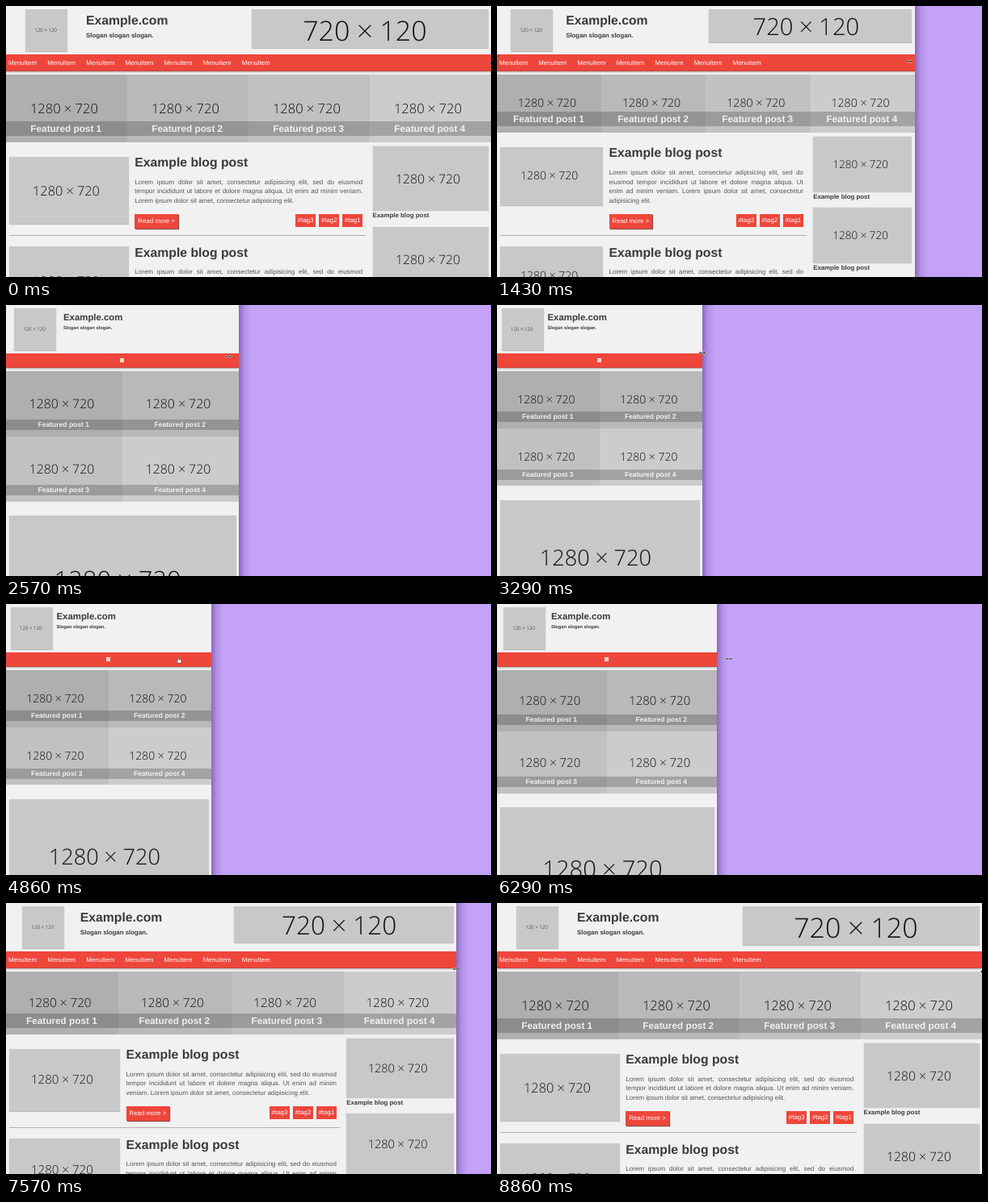
These frames come from a looping animation (600x336 px, 9010 ms). An HTML page:

```html
<!DOCTYPE html>
<html lang="en">
<head>
<meta charset="utf-8">
<title>Responsive blog layout</title>
<style>
html, body { margin: 0; width: 100%; height: 100%; overflow: hidden; background: #c4a2f8; }
h1, h2, p, figure { margin: 0; }
#stage { position: absolute; inset: 0; overflow: clip; contain: strict; }
#shade { position: absolute; top: 0; bottom: 0; left: var(--w); width: 15px; background: linear-gradient(90deg, rgba(45, 15, 95, .38), rgba(45, 15, 95, .12) 45%, transparent); }
#page {
  position: absolute; top: 0; left: 0; width: var(--w); height: 100%;
  overflow: clip; background: #f2f1f1; color: #3b3a3a;
  font: var(--b)/1.4 "Liberation Sans", Arial, sans-serif; text-rendering: geometricPrecision;
  --side: calc(var(--w) / 6); --main: calc(var(--w) - var(--side));
  --thumb: calc(var(--main) / 3 - 1.8px); --head: calc(var(--w) / 6);
}
.wide { --b: 7.87px; --bar: 20.5px; --side: calc(var(--w) / 4) !important; --feat: calc(var(--w) / 4); --ad: calc(var(--w) / 2 - 7px); --ratio: .16667; }
.medium { --b: 7.07px; --bar: 19px; --feat: calc(var(--w) / 2); --ad: calc(var(--w) * 5 / 12 - 7px); --ratio: .33333; }
.small { --b: 5.7px; --bar: 17.5px; --feat: calc(var(--w) / 2); --head: calc(var(--w) / 4) !important; --thumb: calc(var(--w) - 7px) !important; }
.small .ad, .small .text, .small hr, .small aside, .small nav span { display: none; }
.medium figure:nth-child(n+3), .wide nav i, .medium nav i { display: none; }

.img {
  --iw: var(--feat); width: var(--iw); height: calc(var(--iw) * .5625);
  display: flex; align-items: center; justify-content: center; background: #c9c8c8;
  font: 300 calc(var(--iw) * .11)/1 "Open Sans", "Noto Sans", sans-serif; color: #111; white-space: nowrap;
}
.img span { position: relative; left: -2.1%; top: .05em; }
header { position: relative; height: 60px; }
header .img, article .img { position: absolute; box-shadow: 0 1px 1px rgba(0, 0, 0, .22); }
.logo { --iw: 52px; height: 52px; top: 3.5px; left: calc(var(--head) / 2 - 26px); font-size: 6.1px; }
.ad { --iw: var(--ad); height: calc(var(--iw) * var(--ratio)); top: 3.5px; right: 3.5px; font-size: calc(var(--iw) * .116); }
.brand { position: absolute; left: calc(var(--head) - 1px); top: 10.3px; white-space: nowrap; }
h1 { font-size: 2em; line-height: 1.2; }
.brand p { margin-top: .1px; font-weight: bold; line-height: 2.1; }

nav {
  position: relative; height: var(--bar); line-height: calc(var(--bar) + 1.6px); padding-left: 3px; white-space: nowrap;
  color: #fff; background: #ee463b; box-shadow: inset 0 -1px #c9453c, 0 1px 2px rgba(0, 0, 0, .3);
}
nav span { margin-right: 13.2px; }
nav i { position: absolute; left: calc(50% - 3px); top: 6px; width: 5px; height: 5px; background: repeating-linear-gradient(#fff 0 1px, #f5a59f 1px 2px); }

.featured { display: flex; flex-wrap: wrap; margin-top: 4px; }
figure { position: relative; width: var(--feat); }
figcaption {
  position: absolute; left: 0; right: 0; bottom: 7.7px; padding-right: 1.5px; text-align: center;
  font-size: 1.5em; font-weight: bold; line-height: 1.533; color: rgba(255, 255, 255, .85); background: rgba(0, 0, 0, .2);
}
figure:nth-child(1) .img { background: #b0afaf; }
figure:nth-child(2) .img { background: #bab9b9; }
figure:nth-child(3) .img { background: #c2c1c1; }
figure:nth-child(4) .img { background: #cdcccc; }

.content { display: flex; }
main { width: var(--main); padding-top: 17.7px; flex: none; }
.small main { width: var(--w); }
article { position: relative; padding-bottom: 13px; }
article .img { --iw: var(--thumb); left: 3.5px; }
.small article .img { position: relative; }
.text { padding: 1.5px 8.8px 8.4px calc(var(--main) / 3 + 9.3px); }
h2 { font-size: 2em; line-height: .9; margin-bottom: 10.5px; white-space: nowrap; }
.text p { font-size: 1.02em; line-height: 1.44; text-align: justify; color: #555; }
.row { display: flex; align-items: flex-start; margin-top: 10.4px; height: 2.3em; white-space: nowrap; }
.row span { padding: 0 2.6px; margin-left: 4.2px; line-height: 2.04; color: #fff; background: #ee463b; }
.row .more { margin: 0 auto 0 0; padding: 0 4px; line-height: 2.3; box-shadow: 1px 1px 1px #8d4a46; }
hr { margin: 0 4.6px 0 3.5px; border: 0; height: 1px; background: #b3b2b2; }
aside { padding: 5px 3.5px 0; width: calc(var(--side) - 7px); font-weight: bold; }
aside .img { --iw: calc(var(--side) - 7px); box-shadow: 0 0 1px rgba(0, 0, 0, .25); }
aside p { margin: -.2px 0 8.4px; }

#cursor { position: absolute; left: -5px; top: -5px; width: 10px; height: 10px; overflow: visible; stroke: #fff; stroke-width: .6; }
</style>
</head>
<body>
<div id="stage">
  <div id="page"></div>
  <div id="shade"></div>
  <svg id="cursor" viewBox="-6 -6 12 12">
    <path id="resize" fill="#111" d="M-5 0L-2.5-2.2V-.8H2.5V-2.2L5 0L2.5 2.2V.8H-2.5V2.2Z"/>
    <path id="hand" fill="#fff" stroke="#222" d="M-1.6-4.2Q-.8-5 0-4.2V-1.4L3-.8Q3.8-.4 3.6.8L2.8 4H-1.2L-3.8.6Q-3.6-.6-1.6.6Z"/>
  </svg>
</div>
<script>
const $ = id => document.getElementById(id);
const page = $('page');
const img = (label, cls = '') => `<div class="img ${cls}"><span>${label}</span></div>`;
const times = (n, make) => Array.from({ length: n }, (_, i) => make(i + 1)).join('');
const big = '1280 × 720';
const start = 'Lorem ipsum dolor sit amet, consectetur adipisicing elit';
const lorem = `${start}, sed do eiusmod tempor incididunt ut labore et dolore magna aliqua. Ut enim ad minim veniam. ${start}.`;

page.innerHTML = `
<header>${img('120 × 120', 'logo')}
  <div class="brand"><h1>Example.com</h1><p>Slogan slogan slogan.</p></div>${img('', 'ad')}</header>
<nav>${times(7, () => '<span>MenuItem</span>')}<i></i></nav>
<section class="featured">${times(4, i => `<figure>${img(big)}<figcaption>Featured post ${i}</figcaption></figure>`)}</section>
<div class="content">
  <main>${times(2, () => `<article>${img(big)}
    <div class="text"><h2>Example blog post</h2><p>${lorem}</p>
      <div class="row"><span class="more">Read more &gt;</span><span>#tag3</span><span>#tag2</span><span>#tag1</span></div>
    </div><hr></article>`)}</main>
  <aside>${times(3, () => img(big) + '<p>Example blog post</p>')}</aside>
</div>`;
const adLabel = page.querySelector('.ad span');

// Keys are [step, ...values]; the picture advances seven steps a second.
const widths = [[0, 600], [6, 600], [8, 578], [15, 364], [16, 335], [18, 288], [20, 262], [22, 254],
  [43, 254], [44, 272], [47, 380], [51, 520], [53, 557], [56, 590], [58, 600], [63, 600]];
const pointer = [[0, 602, 71], [5, 602, 70], [8, 574, 69], [15, 351, 68], [18, 275, 64], [21, 254, 60], [24, 254, 59],
  [31, 214, 70], [38, 214, 70], [42, 254, 68], [44, 287, 68], [47, 399, 68], [51, 532, 76], [53, 557, 82], [58, 602, 85], [63, 602, 85]];

function at(keys, n) {
  const i = keys.findIndex(k => k[0] > n);
  const a = keys[i - 1], b = keys[i], f = (n - a[0]) / (b[0] - a[0]);
  return a.slice(1).map((v, j) => v + (b[j + 1] - v) * f);
}

function draw(now) {
  const n = Math.min(62, Math.floor((now % 9010 + 5) * 7 / 1000));
  const [w] = at(widths, n), [x, y] = at(pointer, n);
  page.className = w < 300 ? 'small' : w < 447 ? 'medium' : 'wide';
  $('stage').style.setProperty('--w', w + 'px');
  adLabel.textContent = w < 447 ? '360 × 120' : '720 × 120';
  const hand = n > 26 && n < 41;
  $('hand').style.display = hand ? '' : 'none';
  $('resize').style.display = hand ? 'none' : '';
  $('cursor').style.transform = `translate(${x}px, ${y}px)`;
}

const begin = performance.now();
function tick() {
  draw(performance.now() - begin);
  requestAnimationFrame(tick);
}
tick();
</script>
</body>
</html>
```
